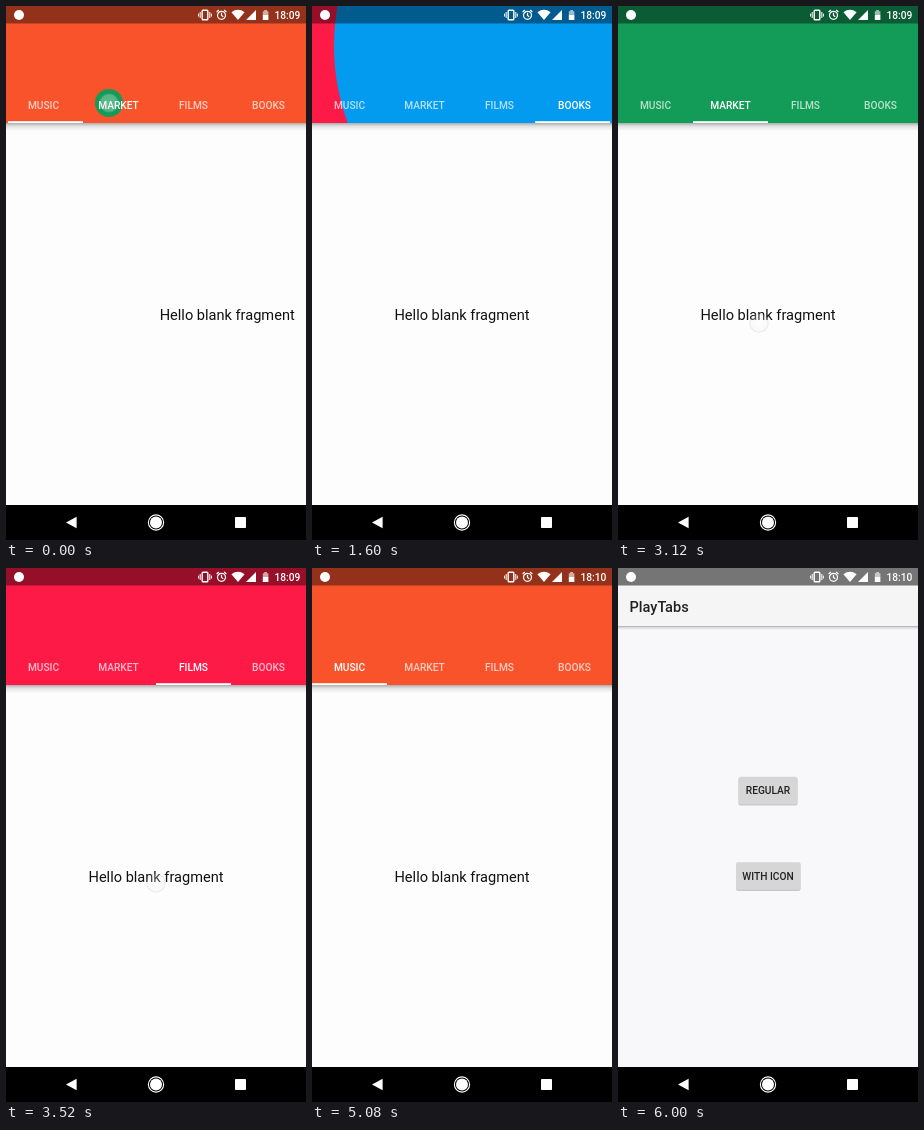
Recreate the animation shown at these times as an HTML page. Size 300 by 534 pixels, loop 6040 ms.

```html
<!DOCTYPE html>
<html lang="en">
<head>
<meta charset="utf-8">
<title>Tabs</title>
<style>
  html, body { margin: 0; width: 100%; height: 100%; overflow: hidden; background: #000; }
  svg { display: block; width: 100%; height: 100%; }
  text { font-family: Roboto, sans-serif; font-size: 10.2px; font-weight: 500; }
  .mid { text-anchor: middle; }
  #tabs text { fill: #fff; }
  #pages text { font-size: 14.58px; font-weight: 400; fill: #111; }
</style>
</head>
<body>
<svg viewBox="0 0 300 534">
  <defs>
    <linearGradient id="shade" x2="0" y2="1">
      <stop stop-color="#000" stop-opacity=".32"/>
      <stop offset=".4" stop-color="#000" stop-opacity=".11"/>
      <stop offset="1" stop-color="#000" stop-opacity="0"/>
    </linearGradient>
    <radialGradient id="touch">
      <stop stop-color="#fff" stop-opacity=".5"/>
      <stop offset=".8" stop-color="#eee" stop-opacity=".5"/>
      <stop offset=".92" stop-color="#aaa" stop-opacity=".5"/>
      <stop offset="1" stop-color="#999" stop-opacity="0"/>
    </radialGradient>
    <clipPath id="bar"><rect width="300" height="117"/></clipPath>
  </defs>

  <g id="home">
    <rect width="300" height="534" fill="#f8f7fa"/>
    <rect y="17" width="300" height="41" fill="#f5f5f5"/>
    <rect y="58" width="300" height="4" fill="url(#shade)"/>
    <rect width="300" height="17.5" fill="#757575"/>
    <text x="11.5" y="43.5" style="font-size:14.58px" fill="#212121">PlayTabs</text>
    <g fill="#000" fill-opacity=".2">
      <rect x="120.5" y="210" width="59" height="27.5" rx="2"/>
      <rect x="118" y="295.5" width="64.5" height="27.5" rx="2"/>
    </g>
    <g fill="#d6d6d7">
      <rect x="120.5" y="208.7" width="59" height="27.5" rx="1.5"/>
      <rect x="118" y="294.2" width="64.5" height="27.5" rx="1.5"/>
    </g>
    <g fill="#212121" class="mid">
      <text x="150" y="226.2">REGULAR</text>
      <text x="150" y="311.8">WITH ICON</text>
    </g>
  </g>

  <g id="screen">
    <rect width="300" height="534" fill="#fefdfe"/>
    <g id="pages" class="mid"></g>
    <rect y="117" width="300" height="8" fill="url(#shade)"/>
    <g clip-path="url(#bar)">
      <rect id="base" width="300" height="117"/>
      <circle id="reveal"/>
      <rect width="300" height="17.5" fill="#000" fill-opacity=".41"/>
    </g>
    <g id="tabs" class="mid"></g>
    <rect id="line" y="115.2" width="75" height="1.8" fill="#fff"/>
  </g>

  <g id="status" fill="#fff">
    <circle cx="13" cy="9" r="5"/>
    <rect x="196.2" y="4.2" width="5.6" height="9.6" rx=".8" fill="none" stroke="#fff" stroke-width="1.4"/>
    <path d="M194.2 6v6M203.8 6v6M192.6 7.6v3M205.4 7.6v3" stroke="#fff" stroke-width="1"/>
    <g fill="none" stroke="#fff" stroke-width="1.2">
      <circle cx="215.5" cy="9.3" r="4"/>
      <path d="M215.5 6.8v2.7l1.8 1.2M210.6 6l2.3-2M220.4 6l-2.3-2"/>
    </g>
    <path d="M225.4 6.2Q232 1.4 238.6 6.2L232 14Z"/>
    <path d="M250 4v10h-10Z"/>
    <path d="M258.2 4h2.8v1.2h1.4v3.8h-5.6v-3.8h1.4Z" fill-opacity=".6"/>
    <path d="M256.8 9h5.6v5h-5.6Z"/>
    <text id="clock" x="294.3" y="12.8" text-anchor="end"></text>
  </g>

  <rect y="499" width="300" height="35" fill="#000"/>
  <g fill="#fff">
    <path d="M60 516.5l10.6-5.8v11.6Z"/>
    <circle cx="150" cy="516.5" r="6"/>
    <circle cx="150" cy="516.5" r="7.6" fill="none" stroke="#fff" stroke-width="1.1"/>
    <rect x="229" y="511" width="11" height="11" rx=".8"/>
  </g>
  <ellipse id="ripple" cx="66" cy="516.5" rx="30" ry="16" fill="#fff"/>
  <circle id="dot" r="10" fill="url(#touch)"/>
</svg>

<script>
const LOOP = 6040, STEP = 40, WIDTH = 300, TAB = 75;
const $ = id => document.getElementById(id);
const set = (node, attrs) => { for (const k in attrs) node.setAttribute(k, attrs[k]); };
const clamp = v => Math.min(1, Math.max(0, v));
const mix = (a, b, p) => a + (b - a) * p;

const linear = p => p;
const settle = p => 1 - (1 - p) ** 5;
const smooth = p => (1 - Math.cos(Math.PI * p)) / 2;
// cubic-bezier(.4, 0, .2, 1), solved by bisection
function standard(p) {
  let lo = 0, hi = 1;
  for (let i = 0; i < 24; i++) {
    const s = (lo + hi) / 2, r = 1 - s;
    if (1.2 * s * r * r + .6 * s * s * r + s ** 3 < p) lo = s; else hi = s;
  }
  return 3 * lo * lo * (1 - lo) + lo ** 3;
}

const names = ['MUSIC', 'MARKET', 'FILMS', 'BOOKS'];
const colors = ['#f9532c', '#129c58', '#fd1a46', '#039bf0'];

// start, duration, from page, to page, easing
const scrolls = [
  [-50, 200, 0, 1, settle],
  [694, 200, 1, 2, settle],
  [1360, 200, 2, 3, settle],
  [1920, 160, 3, 2.65, linear],
  [2080, 400, 2.65, 2, settle],
  [2560, 120, 2, 1.65, linear],
  [2680, 400, 1.65, 1, settle],
  [3160, 100, 1, 1.3, linear],
  [3260, 300, 1.3, 2, settle],
  [3560, 100, 2, 2.25, linear],
  [3660, 500, 2.25, 3, settle],
  [4540, 400, 3, 0, settle]
];
// start, page, centre x, centre y
const reveals = [
  [-50, 1, 103, 97], [694, 2, 198, 43], [1360, 3, 247, 40], [2080, 2, 187, 99],
  [2680, 1, 112, 99], [3260, 2, 187, 99], [3660, 3, 262, 99], [4540, 0, 40, 70]
];
// tap, indicator start, from tab, to tab
const slides = [[-50, -30, 0, 1], [694, 704, 1, 2], [1360, 1360, 2, 3], [4540, 4555, 3, 0]];
// down, up, x and y at both ends
const touches = [
  [-130, -50, 103, 97, 103, 97], [640, 725, 198, 43, 198, 43], [1280, 1360, 247, 40, 247, 40],
  [1880, 2080, 70, 310, 185, 308], [2520, 2680, 80, 322, 195, 318],
  [3120, 3260, 141, 317, 50, 320], [3520, 3660, 150, 315, 60, 317],
  [4440, 4540, 40, 70, 40, 70], [5440, 5570, 66, 516, 66, 516]
];

const latest = (table, t) => table.filter(row => row[0] <= t).pop();

function addText(parent, content, x, y) {
  const node = document.createElementNS('http://www.w3.org/2000/svg', 'text');
  node.textContent = content;
  set(node, { x, y });
  return $(parent).appendChild(node);
}
const tabs = names.map((name, i) => addText('tabs', name, TAB * (i + .5), 103));
const pages = names.map(() => addText('pages', 'Hello blank fragment', 150, 313.7));

function draw(t) {
  const [start, span, from, to, ease] = latest(scrolls, t);
  const page = mix(from, to, ease(clamp((t - start) / span)));
  pages.forEach((node, i) => set(node, { x: 150 + (i - page) * WIDTH }));

  const slide = latest(slides, t);
  const moving = t < slide[1] + 300;
  const tab = moving ? mix(slide[2], slide[3], standard(clamp((t - slide[1]) / 300))) : page;
  set($('line'), { x: tab * TAB });

  const current = latest(reveals, t);
  const before = reveals[reveals.indexOf(current) - 1];
  const [begin, selected, cx, cy] = current;
  const open = clamp((t - begin) / 360);
  set($('base'), { fill: colors[open === 1 ? selected : before ? before[1] : 0] });
  set($('reveal'), { cx, cy, r: WIDTH * smooth(open), fill: colors[selected] });
  tabs.forEach((node, i) => set(node, { 'fill-opacity': i === selected ? 1 : .7 }));

  const [down, up, x0, y0, x1, y1] = latest(touches, t);
  const path = clamp((t - down) / (up - down));
  const alpha = t <= up ? Math.min(1, .5 + (t - down) / 80) : clamp(1 - (t - up) / 130);
  set($('dot'), { cx: mix(x0, x1, path), cy: mix(y0, y1, path), opacity: alpha });

  const press = clamp((t - 5440) / 100) * clamp((5760 - t) / 190);
  set($('ripple'), { opacity: .2 * press });

  const leave = clamp((t - 5640) / 250);
  set($('screen'), {
    transform: `translate(0 ${43 * leave * leave})`,
    opacity: 1 - clamp((t - 5740) / 150)
  });
  $('clock').textContent = t < 4700 ? '18:09' : '18:10';
}

const origin = performance.now();
function tick() {
  const t = (performance.now() - origin) % LOOP;
  draw(Math.floor(t / STEP) * STEP);
  requestAnimationFrame(tick);
}
tick();
</script>
</body>
</html>
```
